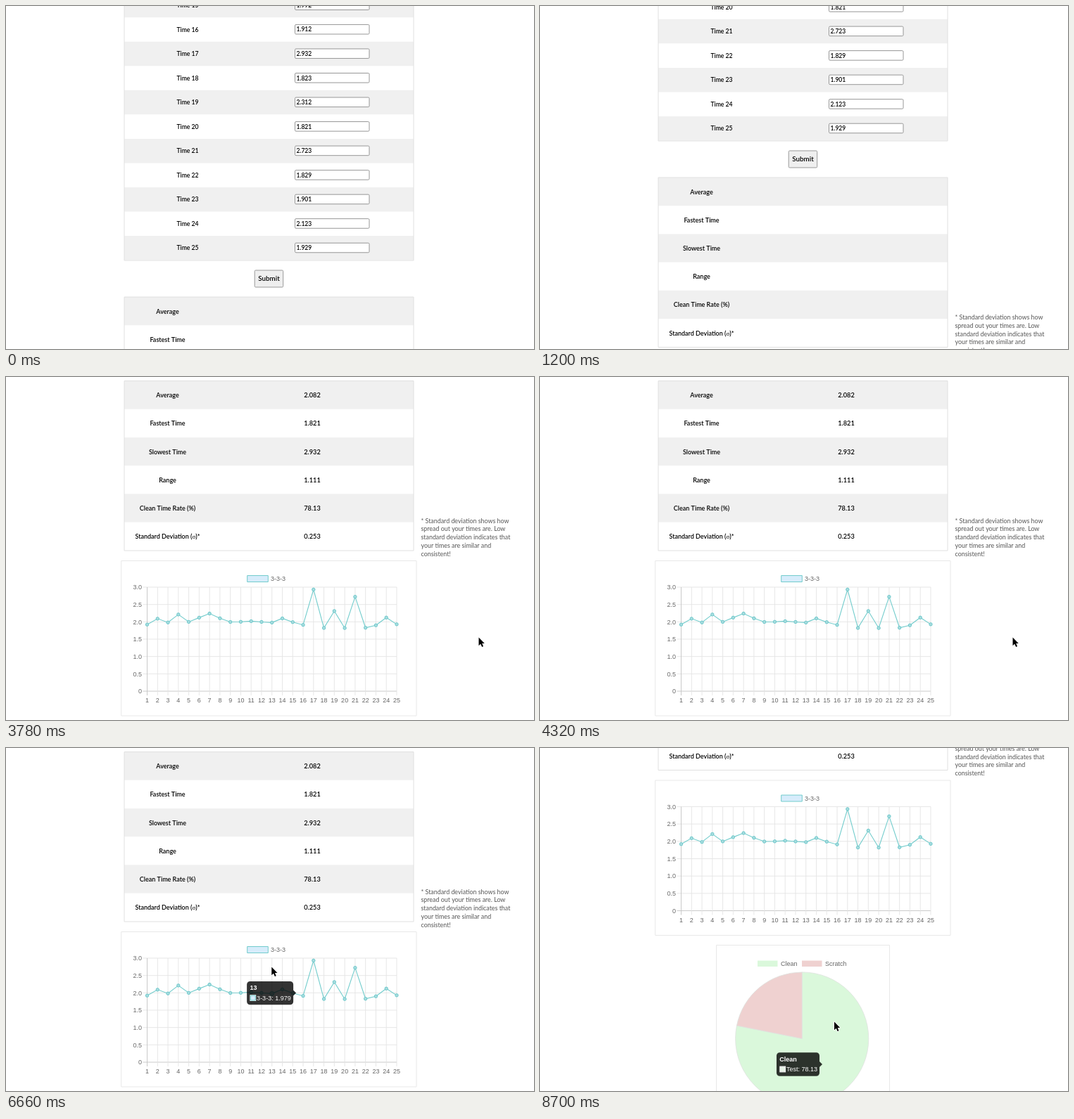
Write an HTML page with a canvas that moves like this. It is 750 px wide and 488 px high and loops after 8.76 s.

```html
<!DOCTYPE html>
<html lang="en">
<head>
<meta charset="utf-8">
<title>Time statistics</title>
<style>
html, body { margin: 0; height: 100%; overflow: hidden; background: #fff; }
canvas { display: block; }
</style>
</head>
<body>
<canvas id="stage" width="750" height="488"></canvas>
<script>
const ctx = document.getElementById('stage').getContext('2d');
const LOOP = 8760, SUBMIT_AT = 1920;
const SCAN_START = 5500, SCAN_END = 7060;
const TABLE = 'Lato, sans-serif', CHART = '"Liberation Sans", Arial, sans-serif';
const TEAL = '#72cccc', PALE = '#d7ecfb', GREEN = '#daf8db', RED = '#efd1d0';

const times = [
  1.921, 2.091, 1.982, 2.212, 1.999, 2.121, 2.239, 2.102, 1.996, 2.001, 2.019, 1.998, 1.979,
  2.099, 1.992, 1.912, 2.932, 1.823, 2.312, 1.821, 2.723, 1.829, 1.901, 2.123, 1.929
];
const stats = [
  ['Average', '2.082'], ['Fastest Time', '1.821'], ['Slowest Time', '2.932'],
  ['Range', '1.111'], ['Clean Time Rate (%)', '78.13'], ['Standard Deviation (σ)*', '0.253']
];
const note = [
  '* Standard deviation shows how', 'spread out your times are. Low',
  'standard deviation indicates that', 'your times are similar and', 'consistent!'
];

const clamp = v => Math.max(0, Math.min(1, v));
const mix = (a, b, p) => a + (b - a) * p;
const smooth = p => p * p * (3 - 2 * p);
const quadOut = p => 1 - (1 - p) ** 2;
const quartOut = p => 1 - (1 - clamp(p)) ** 4;
const linear = p => p;

// Keys are [time, value, easing into this key].
function track(keys, t) {
  let i = 1;
  while (i < keys.length - 1 && t > keys[i][0]) i++;
  const [t0, a] = keys[i - 1], [t1, b, ease = smooth] = keys[i];
  return mix(a, b, ease(clamp((t - t0) / (t1 - t0))));
}

const scrollKeys = [
  [600, 0], [1440, 185, quadOut], [3180, 185], [3770, 408.5],
  [7140, 408.5], [7800, 460, quadOut], [8040, 460], [8640, 624]
];
const cursorX = [
  [1500, 560], [1860, 374], [1980, 374], [2340, 671.5], [4500, 671.5], [4780, 666],
  [5160, 195], [5280, 195], [5400, 202], [SCAN_START, 202], [SCAN_END, 437.5, linear],
  [8080, 437.5], [8600, 418]
];
const cursorY = [
  [1500, 330], [1860, 202], [1980, 202], [2340, 370.5], [4500, 370.5], [4780, 345],
  [4970, 112], [5160, 351], [SCAN_START, 352], [SCAN_END, 303.5],
  [8080, 303.5], [8600, 389.5]
];

function text(str, x, y, size, { font = TABLE, weight = 400, align = 'left', color = '#000' } = {}) {
  ctx.font = `${weight} ${size}px ${font}`;
  ctx.textAlign = align;
  ctx.fillStyle = color;
  ctx.fillText(str, x, y + size * 0.36);
}

function rect(x, y, w, h, fill, stroke, radius = 0, width = 1) {
  ctx.beginPath();
  ctx.roundRect(x, y, w, h, radius);
  if (fill) { ctx.fillStyle = fill; ctx.fill(); }
  if (stroke) { ctx.strokeStyle = stroke; ctx.lineWidth = width; ctx.stroke(); }
}

function line(x0, y0, x1, y1, color) {
  ctx.beginPath();
  ctx.moveTo(x0, y0);
  ctx.lineTo(x1, y1);
  ctx.strokeStyle = color;
  ctx.lineWidth = 0.9;
  ctx.stroke();
}

const bold = { weight: 600, align: 'center' };

function drawTimes() {
  times.forEach((value, i) => {
    const y = 344.2 - (24 - i) * 34.53;
    if (i % 2 === 0) rect(168, y - 17.2, 411, 34.5, '#f0f0f0');
    text('Time ' + (i + 1), 258, y, 8.6, bold);
    rect(410.5, y - 7, 105.5, 13.6, '#fff', '#8c8c8c', 1.5, 0.9);
    text(value.toFixed(3), 412.5, y, 8.5, { weight: 600 });
  });
  rect(168, -520, 411, 882, null, '#e0e0e0');
  rect(353.2, 376, 40.5, 24, '#efefef', '#999', 1.5);
  text('Submit', 373.5, 387.9, 9.8, bold);
}

function drawSigmaLabel(label, y) {
  const [before, after] = label.split('σ');
  const parts = [[before, TABLE, 600], ['σ', '"Liberation Serif", serif', 400], [after, TABLE, 600]];
  const width = ([str, font, weight]) => {
    ctx.font = `${weight} 9px ${font}`;
    return ctx.measureText(str).width;
  };
  let x = 229.5 - parts.reduce((sum, p) => sum + width(p), 0) / 2;
  for (const p of parts) {
    text(p[0], x, y, 9, { font: p[1], weight: p[2] });
    x += width(p);
  }
}

function drawStats(t) {
  stats.forEach(([label, value], i) => {
    const y = 414 + i * 40.2;
    if (i % 2 === 0) rect(168, y, 411, 40.2, '#f0f0f0');
    if (label.includes('σ')) drawSigmaLabel(label, y + 20.4);
    else text(label, 229.5, y + 20.4, 9, bold);
    if (t >= SUBMIT_AT) text(value, 435, y + 20.4, 9.2, bold);
  });
  rect(168, 414, 411, 241.5, null, '#e0e0e0');
  note.forEach((str, i) => text(str, 589.5, 612.8 + i * 11.8, 8.9, { color: '#555' }));
}

const pointX = i => 200.5 + i * 14.77;
const pointY = i => 855.5 - times[i] * 49.33;
const label = { font: CHART, color: '#666' };

function drawLineChart(t, hovered) {
  rect(163.7, 670, 419.3, 220.5, '#fff', '#e8e8e8');
  rect(342.7, 691, 29.6, 9, PALE, TEAL);
  text('3-3-3', 376, 695.6, 9, label);
  for (let i = 0; i <= 6; i++) {
    const y = 855.5 - i * 24.67;
    line(194.5, y, 555, y, i ? '#e5e5e5' : '#c4c4c4');
    text(i ? (i / 2).toFixed(1) : '0', 193, y, 9, { ...label, align: 'right' });
  }
  for (let i = 0; i < 25; i++) {
    line(pointX(i), 707.5, pointX(i), 861.5, i ? '#e5e5e5' : '#c4c4c4');
    text(i + 1, pointX(i), 868.7, 9, { ...label, align: 'center' });
  }
  if (t < SUBMIT_AT) return;
  ctx.beginPath();
  times.forEach((_, i) => ctx.lineTo(pointX(i), pointY(i)));
  ctx.strokeStyle = TEAL;
  ctx.lineWidth = 1.1;
  ctx.stroke();
  times.forEach((_, i) => {
    ctx.beginPath();
    ctx.arc(pointX(i), pointY(i), i === hovered ? 3 : 2.2, 0, 7);
    ctx.fillStyle = '#a9dcdf';
    ctx.fill();
    ctx.strokeStyle = '#62c6c8';
    ctx.lineWidth = 0.9;
    ctx.stroke();
  });
}

function drawPie() {
  rect(250.5, 904.5, 246, 246, '#fff', '#e8e8e8');
  rect(309, 926.5, 28.5, 8.5, GREEN);
  text('Clean', 342, 931, 9, label);
  rect(372, 926.5, 28.5, 8.5, RED);
  text('Scratch', 405, 931, 9, label);
  const top = -Math.PI / 2, split = top + 0.7813 * 2 * Math.PI;
  for (const [from, to, fill] of [[top, split, GREEN], [split, top + 2 * Math.PI, RED]]) {
    ctx.beginPath();
    ctx.moveTo(372.2, 1037.5);
    ctx.arc(372.2, 1037.5, 94.6, from, to);
    ctx.closePath();
    ctx.fillStyle = fill;
    ctx.fill();
    ctx.strokeStyle = '#dfe3df';
    ctx.lineWidth = 0.8;
    ctx.stroke();
  }
}

function drawTooltip(x, y, w, caretLeft, title, body, fill, border, alpha) {
  if (alpha <= 0) return;
  ctx.save();
  ctx.globalAlpha = alpha;
  ctx.beginPath();
  ctx.roundRect(x, y - 16.7, w, 33.4, 4.5);
  const side = caretLeft ? x : x + w, dir = caretLeft ? -4 : 4;
  ctx.moveTo(side, y - 4);
  if (caretLeft) { ctx.lineTo(side, y + 4); ctx.lineTo(side + dir, y); }
  else { ctx.lineTo(side + dir, y); ctx.lineTo(side, y + 4); }
  ctx.closePath();
  ctx.fillStyle = 'rgba(0,0,0,.8)';
  ctx.fill();
  const white = { font: CHART, color: '#fff' };
  text(title, x + 4.3, y - 7.7, 9, { ...white, weight: 700 });
  rect(x + 4.3, y + 2.6, 8.8, 8.8, '#fff');
  rect(x + 5.3, y + 3.6, 6.8, 6.8, fill, border);
  text(body, x + 14, y + 7.1, 9, white);
  ctx.restore();
}

const tipWidth = 66;
const caretOnLeft = i => pointX(i) <= 373;
const tipLeft = i => caretOnLeft(i) ? pointX(i) + 8.5 : pointX(i) - 5 - tipWidth;

function drawLineTooltip(t, hovered) {
  // Each newly hovered point restarts the glide from wherever the box is.
  const reached = i => SCAN_START + (SCAN_END - SCAN_START) * (pointX(i) - 7.4 - 202) / 235.5;
  let x = tipLeft(0), y = pointY(0);
  for (let i = 1; i <= hovered; i++) {
    const until = i < hovered ? reached(i + 1) : t;
    const p = quartOut((until - reached(i)) / 400);
    x = mix(x, tipLeft(i), p);
    y = mix(y, pointY(i), p);
  }
  const alpha = quartOut((t - 5340) / 400) * (1 - quartOut((t - 8200) / 400));
  drawTooltip(x, y, tipWidth, caretOnLeft(hovered), String(hovered + 1),
    '3-3-3: ' + times[hovered], PALE, TEAL, alpha);
}

function drawCursor(t) {
  if (t < 1500) return;
  ctx.save();
  ctx.translate(track(cursorX, t), track(cursorY, t));
  ctx.beginPath();
  for (const [x, y] of [[0, 0], [0, 11.8], [2.7, 9.3], [4.6, 13.6], [6.5, 12.8], [4.7, 8.6], [8.2, 8.5]])
    ctx.lineTo(x, y);
  ctx.closePath();
  ctx.lineJoin = 'round';
  ctx.strokeStyle = '#fff';
  ctx.lineWidth = 1.6;
  ctx.stroke();
  ctx.fillStyle = '#000';
  ctx.fill();
  ctx.restore();
}

function draw(t) {
  const active = t >= 5340 && t < 8200;
  const nearest = Math.round((track(cursorX, t) - 200.5) / 14.77);
  const hovered = t < SCAN_START ? 0 : t > SCAN_END ? 16 : Math.max(0, Math.min(16, nearest));
  ctx.fillStyle = '#fff';
  ctx.fillRect(0, 0, 750, 488);
  ctx.save();
  ctx.translate(0, -track(scrollKeys, t));
  drawTimes();
  drawStats(t);
  drawLineChart(t, active ? hovered : -1);
  drawPie();
  drawLineTooltip(t, hovered);
  drawTooltip(336, 1074, 61, false, 'Clean', 'Test: 78.13', '#e6f3e6', '#e6e6e6', quartOut((t - 8400) / 400));
  ctx.restore();
  drawCursor(t);
}

const start = performance.now();
function frame() {
  draw((performance.now() - start) % LOOP);
  requestAnimationFrame(frame);
}
frame();
</script>
</body>
</html>
```
